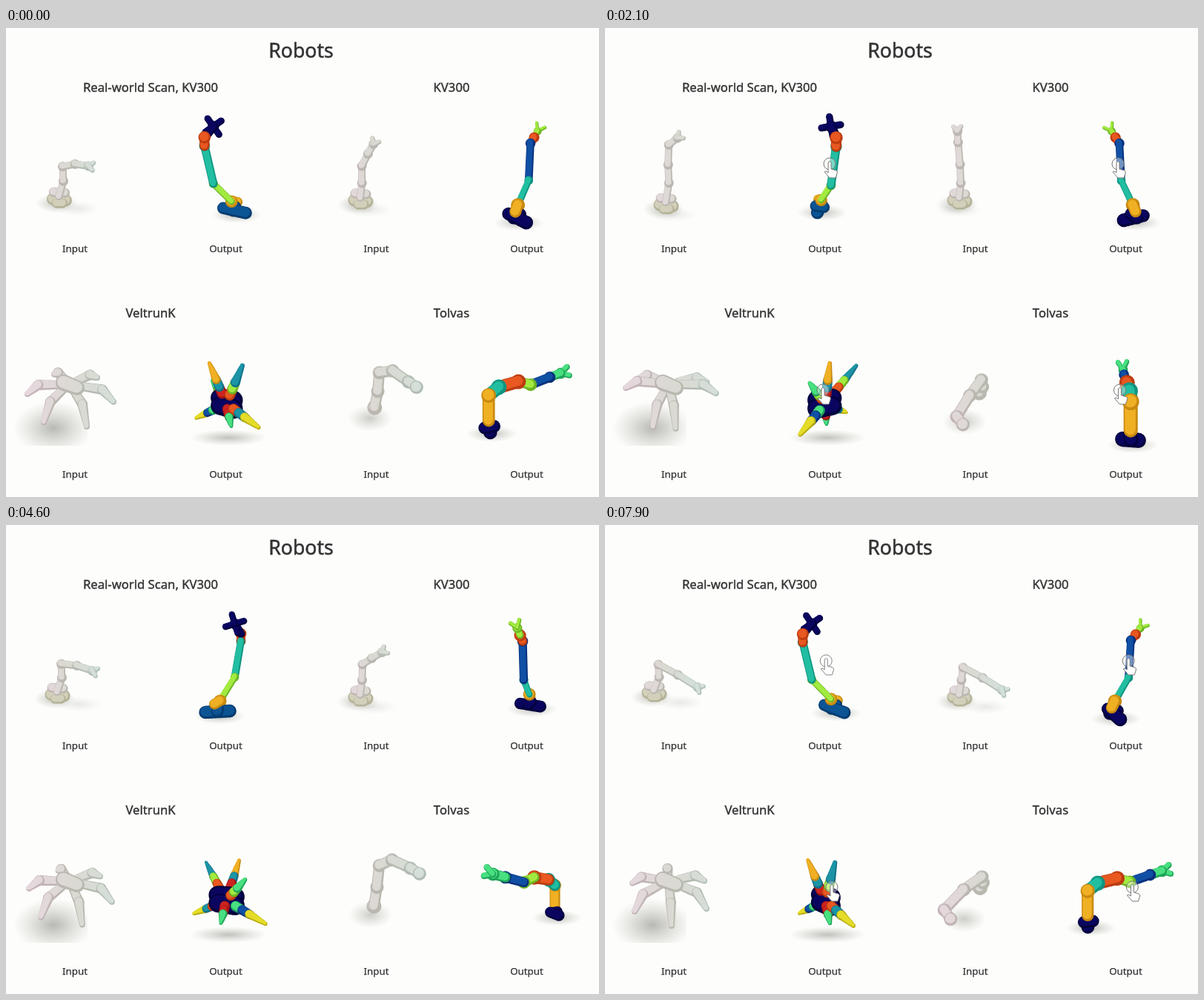
Write an HTML page with a canvas that moves like this. It is 800 by 632 pixels and loops after 8000 ms.

```html
<!DOCTYPE html>
<html lang="en">
<head>
<meta charset="utf-8">
<title>Robots</title>
<style>
  html, body { margin: 0; width: 100%; height: 100%; overflow: hidden; background: #fdfdfc; }
  svg, canvas { position: absolute; left: 0; top: 0; width: 800px; height: 632px; }
  text {
    font: 13.33px "Noto Sans", "Open Sans", sans-serif;
    text-anchor: middle; fill: #333; stroke: #333; stroke-width: .25px;
  }
  .title { font-size: 26.67px; stroke-width: .5px; }
  .name { font-size: 16.67px; stroke-width: .4px; }
</style>
</head>
<body>
<canvas id="stage" width="800" height="632"></canvas>
<svg viewBox="0 0 800 632">
  <text class="title" x="398" y="40">Robots</text>
  <text class="name" x="195" y="85.5">Real-world Scan, KV300</text>
  <text class="name" x="601" y="85.5">KV300</text>
  <text class="name" x="195" y="390">VeltrunK</text>
  <text class="name" x="601" y="390">Tolvas</text>
  <text x="93" y="302">Input</text><text x="296.5" y="302">Output</text>
  <text x="499.5" y="302">Input</text><text x="702.5" y="302">Output</text>
  <text x="93" y="606">Input</text><text x="296.5" y="606">Output</text>
  <text x="499.5" y="606">Input</text><text x="702.5" y="606">Output</text>
</svg>
<script>
const ctx = document.getElementById('stage').getContext('2d');
const LOOP = 8000, STEP = 100, POSE_LOOP = 4800, PROMPT_LOOP = 5000;
const TURN = .043, DEPTH = 250, TILT = .18;

const mix = (a, b, u) => a + (b - a) * u;
const clamp = u => Math.min(1, Math.max(0, u));
const ease = u => u < .5 ? 2 * u * u : 1 - 2 * (1 - u) * (1 - u);
const rad = deg => deg * Math.PI / 180;
const ramp = (t, from, to) => clamp((t - from) / (to - from));

// Colour as [shade, light]
const C = {
  navy: ['#03013c', '#0a0660'], red: ['#a01414', '#cc2420'],
  orange: ['#bc3c10', '#e85820'], amber: ['#c88a10', '#f0b024'],
  yellow: ['#b8ac10', '#e4dc28'], lime: ['#6cb424', '#a2ea40'],
  green: ['#20a458', '#48e080'], teal: ['#109480', '#22bea2'],
  sea: ['#107088', '#1c94a6'], blue: ['#08307c', '#1050a4'],
  steel: ['#063c70', '#0c5494']
};

// Drawing parts

function discs(p, r1, q, r2) {
  const n = Math.ceil(Math.hypot(q.x - p.x, q.y - p.y) / 1.5) + 1;
  ctx.beginPath();
  for (let i = 0; i <= n; i++) {
    const u = i / n, x = mix(p.x, q.x, u), y = mix(p.y, q.y, u), r = mix(r1, r2, u);
    ctx.moveTo(x + r, y);
    ctx.arc(x, y, r, 0, 7);
  }
  ctx.fill();
}

function limb(p, q, w1, w2, [shade, light]) {
  const lift = o => ({ x: o.x - .6, y: o.y - 1 });
  ctx.fillStyle = shade;
  discs(p, w1 / 2, q, w2 / 2);
  ctx.fillStyle = light;
  discs(lift(p), w1 * .38, lift(q), w2 * .38);
}

function shadow(x, y, rx, ry, alpha) {
  ctx.save();
  ctx.translate(x, y);
  ctx.scale(rx, ry);
  const g = ctx.createRadialGradient(0, 0, 0, 0, 0, 1);
  g.addColorStop(0, `rgba(100,100,92,${alpha})`);
  g.addColorStop(.5, `rgba(120,120,105,${alpha * .5})`);
  g.addColorStop(1, 'rgba(140,140,115,0)');
  ctx.fillStyle = g;
  ctx.fillRect(-1, -1, 2, 2);
  ctx.restore();
}

function polar(p, length, deg) {
  return { x: p.x + length * Math.sin(rad(deg)), y: p.y - length * Math.cos(rad(deg)) };
}

// Drag prompt: eased track from 0 through [share, value] steps
function track(u, steps) {
  let left = u * steps.reduce((sum, s) => sum + s[0], 0), from = 0;
  for (const [n, value] of steps) {
    if (left <= n) return mix(from, value, ease(left / n));
    left -= n;
    from = value;
  }
  return from;
}
const wiggle = u => track(u, [[5, -1], [1, -1], [8, 1], [1, 1], [5, 0], [18, 0]]);
const fade = u => track(u, [[1, 1], [5, 1], [1, 0], [6, 0]]);

const ring = new Path2D('M8 0A8 8 0 1 1-8 0A8 8 0 1 1 8 0Z');
const finger = new Path2D('M-2 12V-2Q0-5 2-2V7L9 9Q11 10 10 13L8 19H0L-7 11Q-6 9-2 12Z');

function drawHand(x, y, alpha) {
  ctx.save();
  ctx.translate(x, y);
  ctx.globalAlpha = alpha;
  ctx.strokeStyle = '#777';
  ctx.fillStyle = 'rgba(255,255,255,.4)';
  ctx.fill(ring);
  ctx.stroke(ring);
  ctx.fillStyle = '#fff';
  ctx.fill(finger);
  ctx.stroke(finger);
  ctx.restore();
}

// Turntable models. A point is (radius, azimuth, height on the stage).
// Spine: start, then colour, width, radius and height of each link's end.
const models = [
  {
    cx: 296, eye: 185, handY: 183, yaw: 21, start: 500,
    base: { color: 'steel', r: 13, turn: 40, y: 247 }, from: [18, 237],
    spine: [['amber', 14, 9, 235], ['lime', 9, -17, 208], ['teal', 11, -29, 158],
      ['orange', 13, -29, 147], ['navy', 12, -17, 133]],
    fan: { count: 4, first: 15, step: 90, length: 13, width: 9 }
  },
  {
    cx: 701, eye: 185, handY: 183, yaw: 52, start: 1400,
    base: { color: 'navy', r: -18, turn: 95, y: 249 }, from: [-21, 241],
    spine: [['amber', 15, -16, 234], ['teal', 9, 7, 207], ['blue', 11, 11, 156],
      ['orange', 12, 20, 148], ['lime', 9, 29, 139]],
    fan: { count: 2, first: -35, step: 70, length: 11, width: 5 }
  },
  {
    cx: 703, eye: 480, handY: 488, yaw: 16, start: 1200,
    base: { color: 'navy', r: -50, turn: 90, y: 534, size: 9 }, from: [-51, 524],
    spine: [['amber', 16, -51, 492], ['teal', 17, -38, 482], ['orange', 17, -12, 476],
      ['lime', 14, 5, 481], ['blue', 13, 33, 472], ['green', 13, 50, 467]],
    fan: { count: 2, first: -25, step: 60, length: 12, width: 8 }
  },
  {
    cx: 297, eye: 500, handY: 488, yaw: 18, start: 880,
    base: { r: 0, y: 545 },
    // Leg tip, then colours from hip to tip
    legs: [
      [-23, 0, 452, 'red', 'sea', 'amber'], [48, 85, 455, 'orange', 'lime', 'sea'],
      [-27, 60, 477, 'orange', 'lime', 'green'], [-52, 48, 534, 'green', 'blue', 'yellow'],
      [50, 57, 529, 'orange', 'sea', 'yellow'], [7, 30, 536, 'red', 'red', 'green']
    ]
  }
];

// Parts are {p, q, w, end, color}, where p and q are projected points
function armParts({ base, from, spine, fan }, project) {
  const parts = [];
  const add = (color, w, p, q, end = w) => parts.push({ color, w, p, q, end });
  const around = (along, side, y) => {
    const t = rad(base.turn);
    const a = base.r + along * Math.cos(t) - side * Math.sin(t);
    const b = along * Math.sin(t) + side * Math.cos(t);
    return project(Math.hypot(a, b), Math.atan2(b, a) * 180 / Math.PI, y);
  };
  const size = base.size || 16;
  add(base.color, 17, around(-size, 0, base.y), around(size, 0, base.y + 2));
  add(base.color, 16, around(0, -6, base.y - 2), around(0, 6, base.y - 1));

  let p = project(from[0], 0, from[1]), last;
  for (const [color, w, r, y] of spine) {
    const q = project(r, 0, y);
    add(color, w, p, q);
    add(color, w + 3, q, q);
    last = p;
    p = q;
  }
  const heading = Math.atan2(p.x - last.x, last.y - p.y) * 180 / Math.PI;
  for (let i = 0; i < fan.count; i++) {
    const tip = polar(p, fan.length, heading + fan.first + i * fan.step);
    add(spine.at(-1)[0], fan.width, p, { ...tip, near: p.near, scale: p.scale });
  }
  return parts;
}

function walkerParts({ legs }, project) {
  const parts = [];
  for (const y of [500, 511]) {
    parts.push({ color: 'navy', w: 26, end: 26, p: project(-13, 66, y), q: project(13, 66, y) });
  }
  for (const [r, azimuth, y, ...colors] of legs) {
    const at = u => project(r * u, azimuth, mix(506, y, u));
    const cuts = [.25, .42, .6, 1];
    colors.forEach((color, i) => parts.push({
      color, w: 14 - i, end: i < 2 ? 13 - i : 5, p: at(cuts[i]), q: at(cuts[i + 1])
    }));
  }
  return parts;
}

function drawOutput(m, t) {
  const since = t - m.start;
  const u = since < 0 ? 0 : since % PROMPT_LOOP / PROMPT_LOOP;
  const shift = wiggle(u), yaw = m.yaw + TURN * t + 11 * shift;
  const project = (r, azimuth, y) => {
    const near = -r * Math.sin(rad(yaw - azimuth)), scale = 1 + near / DEPTH;
    return {
      x: m.cx + r * Math.cos(rad(yaw - azimuth)) * scale,
      y: m.eye + (y - m.eye) * scale + TILT * near, near, scale
    };
  };
  const foot = project(m.base.r, 0, m.base.y + 7);
  shadow(foot.x + 3, foot.y, m.legs ? 52 : 34, 11, .4);
  const parts = m.legs ? walkerParts(m, project) : armParts(m, project);
  parts.sort((a, b) => a.p.near + a.q.near - b.p.near - b.q.near);
  for (const { p, q, w, end, color } of parts) {
    limb(p, q, w * p.scale, end * q.scale, C[color]);
  }
  if (since >= 0) drawHand(m.cx + 9 * shift, m.handY, fade(u));
}

// Inputs: all follow one pose cycle, from upright (0) to folded out (1)
const foldAt = t => t < 3500
  ? Math.max(ease(ramp(t, 1900, 3100)), 1 - ease(ramp(t + POSE_LOOP, 4000, 6000)))
  : 1 - ease(ramp(t, 4000, 6000));

const tints = [['#c6b2b8', '#b8b8ae', '#aebeb6'], ['#e6d8de', '#dad9d2', '#d4e0da']];
const stone = ['#b4b298', '#d2d0ba'];

function clay(x1, x2) {
  return tints.map(colors => {
    const g = ctx.createLinearGradient(x1, 0, x2, 0);
    colors.forEach((color, i) => g.addColorStop(i / 2, color));
    return g;
  });
}

function chain(points, width, color) {
  for (let i = 1; i < points.length; i++) {
    limb(points[i - 1], points[i], width, width, color);
    limb(points[i], points[i], width + 3, width + 3, color);
  }
}

// upright, folded: base, shoulder and elbow
function drawSmallArm(upright, folded, fold, lean) {
  const [base, shoulder, elbow] = upright.map(([x, y], i) => (
    { x: mix(x, folded[i][0], fold), y: mix(y, folded[i][1], fold) }));
  const wrist = polar(elbow, 30 - 60 * fold * (1 - fold), mix(-5, 118, fold));
  const angle = mix(lean, 122, fold), tip = polar(wrist, 15 + 16 * fold ** 4, angle);
  const color = clay(base.x - 25, base.x + 55);
  const at = (dx, dy) => ({ x: base.x + dx, y: base.y + dy });
  shadow(base.x - 3, base.y + 9, 28, 13, .4);
  shadow(mix(base.x, tip.x, .6), base.y + 16, 32, 10, .14);
  limb(at(-8, 3), at(9, 5), 17, 17, stone);
  limb(at(-3, 9), at(5, 9), 13, 13, stone);
  limb(at(-7, -6), at(8, -5), 13, 13, color);
  chain([base, shoulder, elbow, wrist, tip], 10, color);
  for (const side of [-40, 40]) limb(tip, polar(tip, 8, angle + side), 8, 6, color);
}

// Links: length and heading when stretched, then when tucked
const longLinks = [[28, 8, 8, 30], [32, 7, 8, -10], [19, 58, 30, 235], [28, 109, 38, 224], [15, 120, 15, 145]];

function drawLongArm(t) {
  const late = t < 3100 ? t + POSE_LOOP : t;
  const tuck = late < 4500 ? 1 - ease(ramp(late, 3100, 4500))
    : Math.sin(ramp(late, 4500, 7900) * Math.PI / 2);
  const shrink = 1 - tuck * (1 - tuck);
  const points = [{ x: mix(496, 506, tuck), y: mix(515, 489, tuck) }];
  for (const [l1, a1, l2, a2] of longLinks) {
    points.push(polar(points.at(-1), mix(l1, l2, tuck) * shrink, mix(a1, a2, tuck)));
  }
  const root = points[0];
  shadow(root.x - 4 - 18 * tuck, root.y + 10 + 32 * tuck, 30, 18, .32);
  limb(root, root, 20, 20, clay(445, 570));
  chain(points, 15, clay(445, 570));
}

// Six legs, 60 degrees apart; neighbours swing in turn
function drawWalker(fold) {
  const color = clay(30, 155);
  ctx.save();
  ctx.beginPath();
  ctx.rect(10, 420, 100, 143);
  ctx.clip();
  shadow(64, 539, 54, 36, .45);
  ctx.restore();
  const legs = [];
  for (let i = 0; i < 6; i++) {
    const swing = i % 2 ? 38 * (1 - fold) ** .6 : 88 * fold * (1 - fold);
    const angle = rad(87 + 60 * i - swing), c = Math.cos(angle), s = Math.sin(angle);
    const tip = { x: 87 + c * (56 + 8 * (1 - fold)), y: 498 + s * (s > 0 ? 42 : 34) };
    const hip = { x: 86 + 16 * c, y: 482 + 8 * s };
    const knee = { x: mix(hip.x, tip.x, .65), y: mix(hip.y, tip.y, .5) - 6 };
    legs.push({ hip, knee, tip });
  }
  legs.sort((a, b) => a.tip.y - b.tip.y);
  for (const { hip, knee, tip } of legs) {
    limb(hip, knee, 12, 14, color);
    limb(knee, tip, 14, 8, color);
  }
  limb({ x: 78, y: 478 }, { x: 96, y: 485 }, 22, 20, color);
}

function draw(now) {
  const t = Math.floor(now % LOOP / STEP) * STEP, cycle = t % POSE_LOOP, fold = foldAt(cycle);
  ctx.fillStyle = '#fdfdfc';
  ctx.fillRect(0, 0, 800, 632);
  drawSmallArm([[83, 236], [87, 209], [86, 184]], [[66, 223], [73, 205], [72, 188]], fold, 48);
  drawSmallArm([[478, 229], [480, 209], [479, 184]], [[478, 229], [481, 209], [483, 192]], fold ** 3.5, -3);
  drawWalker(fold);
  drawLongArm(cycle);
  models.forEach(m => drawOutput(m, t));
}

let begin;
function tick(now) {
  begin ??= now;
  draw(now - begin);
  requestAnimationFrame(tick);
}
draw(0);
requestAnimationFrame(tick);
</script>
</body>
</html>
```
